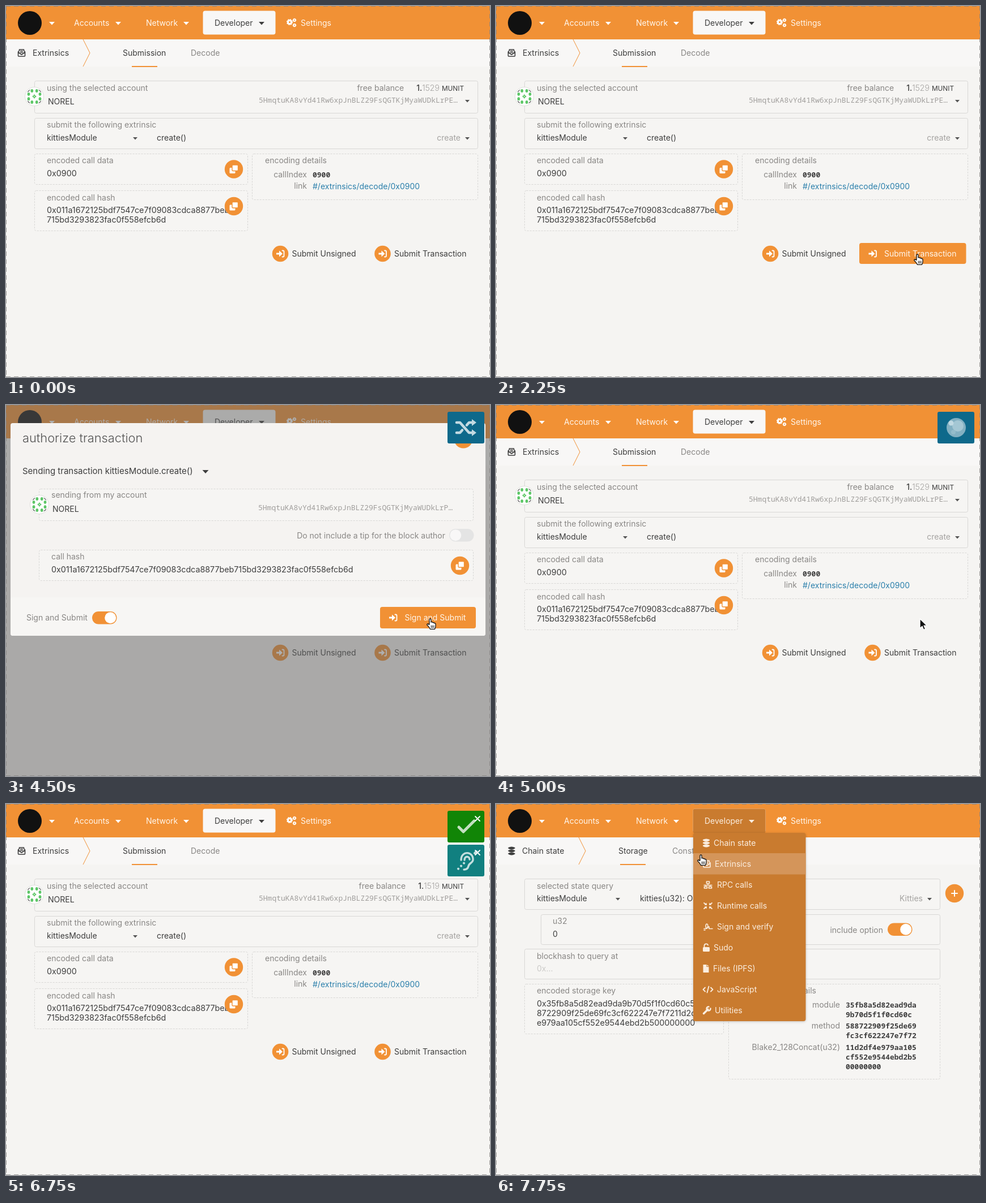
Recreate the animation shown at these times as an HTML page. Size 854 px wide and 656 px high, loop 8000 ms.

```html
<!DOCTYPE html>
<html lang="en">
<head>
<meta charset="utf-8">
<title>Extrinsic submission</title>
<style>
  html, body { margin: 0; width: 100%; height: 100%; overflow: hidden; background: #f5f4f2; }
  svg { display: block; width: 854px; height: 656px; }
  text { font: 14px Inter, "Open Sans", sans-serif; fill: #3e3e3e; white-space: pre; }
  .label { fill: #898785; }
  .faint { fill: #a5a3a1; }
  .ghost { fill: #cbcac8; }
  .white { fill: #fff6ec; }
  .menu { fill: #fbeee0; }
  .link { fill: #2a7fab; }
  .end { text-anchor: end; }
  .hex { font-size: 14.28px; }
  .mono { font: 600 13px "Noto Sans Mono", "DejaVu Sans Mono", monospace; }
  .address { font: 13px "Noto Sans Mono", "DejaVu Sans Mono", monospace; fill: #a09e9c; }
  .title { font-size: 21.8px; font-weight: 300; fill: #555; }
  .lead { font-size: 15px; }
  .part { visibility: hidden; }
  .part.on { visibility: visible; }
</style>
</head>
<body>
<svg id="stage" viewBox="0 0 854 656"></svg>
<script>
const ORANGE = '#f19135', MENU = '#c97b2f', DARK = '#3e3e3e';
const ACCOUNT = 'NOREL';
const ADDRESS = '5HmqtuKA8vYd41Rw6xpJnBLZ29FsQGTKjMyaWUDkLrPE';
const HASH = ['0x011a1672125bdf7547ce7f09083cdca8877beb', '715bd3293823fac0f558efcb6d'];

const text = (x, y, content, cls = '') => `<text x="${x}" y="${y}" class="${cls}">${content}</text>`;
const box = (l, t, r, b, fill, rx = 0, extra = '') =>
  `<rect x="${l}" y="${t}" width="${r - l}" height="${b - t}" rx="${rx}" fill="${fill}" ${extra}/>`;
const disc = (x, y, r, fill) => `<circle cx="${x}" cy="${y}" r="${r}" fill="${fill}"/>`;
const at = (x, y, content, color = '#fff') =>
  `<g transform="translate(${x} ${y})" fill="${color}" stroke="none" color="${color}">${content}</g>`;
const line = (d, width = 1.5) =>
  `<path d="${d}" fill="none" stroke="currentColor" stroke-width="${width}" stroke-linecap="round" stroke-linejoin="round"/>`;
const fill = d => `<path d="${d}"/>`;
const part = (id, content) => `<g class="part" id="${id}">${content}</g>`;

const panel = (l, t, r, b, dashed) => box(l + .5, t + .5, r - .5, b - .5, '#f6f5f3', 3,
  `stroke="#d8d7d5" ${dashed ? 'stroke-dasharray="3 2"' : ''}`);
const caret = (x, y, color = '#555', w = 4) => at(x, y, fill(`M${-w}-2h${2 * w}L0 ${w - 1.5}z`), color);

const icon = {
  signIn: fill('M-7-1.6h5v-3.9L4 0l-6 5.5V1.6h-5z') + line('M3.5-5.5h1.2q1.8 0 1.8 1.8v7.4q0 1.8-1.8 1.8H3.5', 1.8),
  copy: box(-7.5, -2.5, 2.5, 7.5, '#fff', 1.5) + box(-3, -7.5, 7.5, 3, '#fff', 1.5, `stroke="${ORANGE}" stroke-width="1.4"`),
  gear: r => `<circle r="${r}" fill="none" stroke="currentColor" stroke-width="${r}"/>` +
    `<circle r="${r * 1.5}" fill="none" stroke="currentColor" stroke-width="${r * .5}" stroke-dasharray="${r * .59}"/>`,
  envelope: line('M-6-1.5V-2L-4-4V-6H4v2l2 2v7q0 1-1 1H-5q-1 0-1-1V-1.5L0 3l6-4.5', 1.6) + line('M-2-3.5h4M-2-1h4', 1.3),
  database: [-5, 0, 5].map(y => fill(`M-6 ${y - 1}q6-3 12 0v1.5q-6 4-12 0z`)).join(''),
  network: line('M-7 .5H7M0-2V.5M-4 .5V3M4 .5V3', 1.3) + line('M-2.5-6h5v3.5h-5zM-6.5 3h5v3h-5zM1.5 3h5v3h-5z', 1.6),
  compress: line('M-7-5l4 3M7-5l-4 3M-7 5l4-3M7 5l-4-3', 1.8) +
    fill('M-2-1.5h-4.5l4-4zM2-1.5h4.5l-4-4zM-2 1.5h-4.5l4 4zM2 1.5h4.5l-4 4z'),
  sign: line('M-7 3.5h3c4 0 5-8 2-8.5-3 0-2 9 0 8s3-4 4-3-1 3 0 3.5h6M-7 6h2', 1.6),
  unlock: box(-6, -1, 6, 7, 'currentColor', 1.5) + line('M-3.5-1v-2.5c0-4 6-4 6.5-1', 1.8),
  file: fill('M-5-7h6v4h4V7H-5zM2-7l3 3H2z'),
  code: line('M-5-3.5L-8.5 0L-5 3.5M5-3.5L8.5 0L5 3.5M1.5-5.5l-3 11', 1.8),
  wrench: line('M-5.5 5.5L2-2', 3.4) + line('M6.5-3.5A3.5 3.5 0 1 1 3.5-6.5', 2.4),
  compass: line('M6 0A6 6 0 1 1 6-.1', 1.6) + fill('M3-3L1 1-3 3-1-1z'),
  calendar: line('M-5.5-4.5h11v10h-11zM-5.5-1.5h11M-2.5-6.5v2M2.5-6.5v2', 1.7),
  shuffle: line('M-17-9h6L5 9h7M-17 9h6l4-4.5M1-4.5L5-9h7', 4.6) + fill('M10-15l8 6-8 6zM10 3l8 6-8 6z'),
  check: line('M-13 1l8 8L14-10', 5),
  ear: line('M-9-1C-9-18 13-17 12-1c-1 6-7 5-8 11-1 4-4 6-8 6M-3-1c0-8 9-7 9-1', 3.4) +
    line('M-14 14.5l.1.1M-9 9.5l.1.1M-4 4.5l.1.1M15-13l3-3', 4),
  close: line('M-4-4L4 4M4-4L-4 4', 1.8),
};

const copyButton = (x, y) => disc(x, y, 16.2, ORANGE) + at(x, y, icon.copy);
const actionButton = (x, y, name) => disc(x, y, 14.3, ORANGE) + at(x, y, icon.signIn) + text(x + 20.5, y + 5, name);
const hoverButton = (x, y, name, l, t, r, b) =>
  box(l, t, r, b, ORANGE, 4) + at(x, y, icon.signIn) + text(x + 20.5, y + 5, name, 'white');
const toggle = (x, y, on) => box(x, y, x + 43.5, y + 22.5, on ? ORANGE : '#e4e4e4', 11.25) +
  disc(x + (on ? 32.2 : 11.3), y + 11.25, 10, on ? '#fff' : '#f8f7f7');

function identicon(x, y) {
  const dots = [[4.2, 10], [10, 4.2]].flatMap(([a, b]) =>
    [[1, 1], [1, -1], [-1, 1], [-1, -1]].map(([s, u]) =>
      `<ellipse cx="${a * s}" cy="${b * u}" rx="2.4" ry="2.9" fill="#5dc667"/>`)).join('');
  const turns = shape => [0, 90, 180, 270].map(a => `<g transform="rotate(${a})">${shape}</g>`).join('');
  return at(x, y, `<circle r="16.5" fill="#fff" stroke="#dedddb"/>` + dots +
    turns('<path d="M7 12.5Q11 11 12.5 7L9.5 9.5z" fill="#333"/>') + turns(disc(2, 0, 1.4, '#5dc667')));
}

const balance = value => `<text x="808" y="150" class="end"><tspan class="label">free balance</tspan>` +
  `<tspan dx="22" font-weight="500">1.</tspan><tspan font-weight="300" fill="#a5a3a1">${value}</tspan>` +
  `<tspan dx="4" font-size="11.8">MUNIT</tspan></text>`;

const developerTab = open => box(347.5, 8.5, 475.5, open ? 52 : 50.5, open ? MENU : '#f8f7f6', 4) +
  text(368, 35, 'Developer', open ? 'menu' : '') + caret(451, 30, open ? '#fbeee0' : DARK, 5);

const header = box(0, 0, 854, 59, ORANGE) + disc(42, 30, 21, '#111') +
  text(120, 35, 'Accounts', 'white') + text(247, 35, 'Network', 'white') + text(520, 35, 'Settings', 'white') +
  [81, 198, 318].map(x => caret(x, 30, '#fff', 5)).join('') + developerTab(false) +
  at(500.5, 28.5, icon.gear(3.2)) + at(509, 25, icon.gear(1.9)) + at(509, 34, icon.gear(1.9)) +
  box(0, 59, 854, 107, '#f8f7f6');

const subNav = (glyph, name, x, chevron, tab, tabX, lineX) => at(27.5, 83, glyph, DARK) + text(x, 88, name) +
  `<path d="M${chevron} 59l12 24-12 24" fill="none" stroke="${ORANGE}"/>` +
  text(tabX, 88, tab) + box(lineX, 106, lineX + 45, 108, ORANGE);

const extrinsics = subNav(icon.envelope, 'Extrinsics', 47, 136, 'Submission', 206, 222) + text(326, 88, 'Decode', 'label') +
  panel(50, 132, 833, 190) + text(72, 150, 'using the selected account', 'label') + text(74, 174, ACCOUNT) +
  text(446, 171, ADDRESS + '…', 'address') + caret(814, 168) + identicon(50, 160) +
  panel(50, 198, 833, 253) + text(72, 215, 'submit the following extrinsic', 'label') +
  text(72, 238, 'kittiesModule') + caret(228, 234) + text(266, 238, 'create()') +
  text(802, 238, 'create', 'faint end') + caret(814, 234) +
  panel(50, 261, 427, 316, 1) + text(72, 278, 'encoded call data', 'label') + text(72, 301, '0x0900', 'hex') + copyButton(402, 288.5) +
  panel(50, 326, 427, 398, 1) + text(72, 344, 'encoded call hash', 'label') +
  text(72, 366, HASH[0], 'hex') + text(72, 383, HASH[1], 'hex') + copyButton(402, 354) +
  panel(434, 261, 833, 343, 1) + text(457, 278, 'encoding details', 'label') +
  text(531, 303, 'callIndex', 'label end') + text(541, 303, '0900', 'mono') +
  text(531, 323, 'link', 'label end') + text(541, 324, '#/extrinsics/decode/0x0900', 'link') +
  actionButton(484, 438, 'Submit Unsigned') + actionButton(664.5, 438, 'Submit Transaction');

const details = [[360, '35fb8a5d82ead9da'], [377, '9b70d5f1f0cd60c'], [397, '588722909f25de69'], [414, 'fc3cf622247e7f72'],
  [435, '11d2df4e979aa105'], [452, 'cf552e9544ebd2b5'], [469, '00000000']];

const chainState = subNav(icon.database, 'Chain state', 46, 146, 'Storage', 216, 219) +
  text(311, 88, 'Constants', 'label') + text(421, 88, 'Raw storage', 'label') +
  panel(50, 132, 784, 187) + text(72, 150, 'selected state query', 'label') +
  text(72, 172, 'kittiesModule') + caret(215, 168) + text(254, 172, 'kitties(u32): Option&lt;Kitty&gt;') +
  text(753, 172, 'Kitties', 'faint end') + caret(765, 168) +
  disc(809, 158, 16.2, ORANGE) + at(809, 158, line('M-5 0H5M0-5V5', 2)) +
  panel(79, 195, 784, 249) + text(100, 212, 'u32', 'label') + text(100, 235, '0') +
  text(683, 228, 'include option', 'label end') + toggle(691, 210.5, true) +
  panel(50, 256, 784, 310) + text(72, 274, 'blockhash to query at', 'label') + text(72, 296, '0x...', 'ghost') +
  panel(50, 318, 402, 407, 1) + text(72, 335, 'encoded storage key', 'label') +
  ['0x35fb8a5d82ead9da9b70d5f1f0cd60c58', '8722909f25de69fc3cf622247e7f7211d2df4', 'e979aa105cf552e9544ebd2b500000000']
    .map((s, i) => text(72, 358 + 17 * i, s, 'hex')).join('') + copyButton(377, 346) +
  panel(410, 318, 784, 487, 1) + text(565, 335, 'storage key details', 'label end') +
  text(607, 360, 'module', 'label end') + text(607, 397, 'method', 'label end') +
  text(607, 435, 'Blake2_128Concat(u32)', 'label end') + details.map(([y, s]) => text(617, y, s, 'mono')).join('');

const modal = box(0, 0, 854, 656, 'rgba(96,96,96,.5)') + box(8, 32, 846, 408, '#f5f3f1', 4) + box(8, 340, 846, 408, '#f7f6f4', 4) +
  text(29, 66, 'authorize transaction', 'title') + disc(807, 60, 16.5, ORANGE) +
  text(29, 122, 'Sending transaction kittiesModule.create()', 'lead') + caret(352, 117, DARK, 5.5) +
  panel(58, 148, 825, 205, 1) + identicon(59, 176) + text(80, 164, 'sending from my account', 'label') +
  text(82, 189, ACCOUNT) + text(445, 186, ADDRESS.slice(0, 43) + '…', 'address') +
  text(775, 236, 'Do not include a tip for the block author', 'label end') + toggle(782, 219, false) +
  panel(58, 256, 825, 311, 1) + text(80, 273, 'call hash', 'label') + text(80, 296, HASH.join(''), 'hex') + copyButton(801, 284) +
  text(36, 381, 'Sign and Submit', 'label') + toggle(152, 365, true) + actionButton(683, 376, 'Sign and Submit');

const notice = (y, color, content) => box(779, y, 844, y + 56, color, 3) + content;
const spinner = disc(0, 0, 17, '#82b0c2') + disc(3, -3, 10, '#a4c7d4') + disc(-9, -8, 4.5, '#c0d9e2') + disc(-5, 8, 4, '#94bccb');
const result = (y, color, glyph) =>
  notice(y, color, at(812, y + 28, glyph, 'rgba(255,255,255,.75)') + at(832, y + 14, icon.close));

const menuItems = rows => rows.map(([glyph, x, name], i) =>
  at((354 + x) / 2 + 2, 69 + 37 * i, icon[glyph], '#fbeee0') + text(x, 74 + 37 * i, name, 'menu')).join('');
const menuBox = rows => box(348, 51, 546.5, 51 + 37 * rows, MENU, 4, 'style="filter:drop-shadow(0 1px 2px #0003)"');
const developerRows = [['database', 384, 'Chain state'], ['envelope', 386, 'Extrinsics'], ['network', 390, 'RPC calls'],
  ['compress', 390, 'Runtime calls'], ['sign', 390, 'Sign and verify'], ['unlock', 384, 'Sudo'],
  ['file', 383, 'Files (IPFS)'], ['code', 390, 'JavaScript'], ['wrench', 386, 'Utilities']];
const networkRows = [['compass', 386, 'Explorer'], ['calendar', 386, 'Event calendar']];

const outline = 'stroke-width="1.3" stroke-linejoin="round"';
const arrow = `<path d="M1 1v17l4-3.7 2.6 6 3-1.3-2.6-5.8h5.5z" fill="#111" stroke="#fff" ${outline}/>`;
const hand = `<path d="M5 11V2.5q0-1.5 1.5-1.5T8 2.5V7q2.5-1 3 .8 2-.8 2.5 1 2.3-.6 2.5 1.5v4q0 2-1.5 5H6.5Q5 15.5 1 12q-.5-2 1.5-2 1.5.3 2.5 2" fill="#fff" stroke="#111" ${outline}/>` +
  line('M8.3 13v4M10.6 13v4M12.9 13v4', 1);

const stage = document.getElementById('stage');
stage.innerHTML = box(0, 0, 854, 656, '#f5f4f2') + header +
  part('extrinsics', extrinsics) + part('before', balance('1529')) + part('after', balance('1519')) +
  part('chain', chainState) +
  part('hoverUnsigned', hoverButton(484, 438, 'Submit Unsigned', 460, 419, 635, 456)) +
  part('hoverSigned', hoverButton(664.5, 438, 'Submit Transaction', 641, 419, 829.5, 456)) +
  part('modal', modal) + part('hoverSign', hoverButton(683, 376, 'Sign and Submit', 660, 357, 829, 395)) +
  part('queued', notice(12, '#0e698b', at(812, 40, icon.shuffle, '#c3dae2'))) +
  part('sending', notice(12, '#0e698b', at(812, 40, `<g id="spinner">${spinner}</g>`))) +
  part('done', result(12, '#118506', icon.check) + result(72, '#118080', icon.ear)) +
  part('developer', developerTab(true) + menuBox(9)) +
  part('hoverRow', box(348, 87, 546.5, 124.5, '#d4955a')) +
  part('developerItems', menuItems(developerRows)) +
  part('network', `<g transform="translate(-120 0)">${box(348, 9, 463, 52, MENU, 4)}${menuBox(2)}${menuItems(networkRows)}</g>` +
    text(247, 35, 'Network', 'menu') + caret(318, 30, '#fbeee0', 5)) +
  `<path d="M.5 0V656M853.5 0V656M0 .5H854M0 655.5H854" stroke="#858381" stroke-dasharray="8 6" opacity=".75"/>` +
  `<g id="pointer">${part('arrow', arrow)}${part('hand', at(0, 0, hand, '#111'))}</g>`;

// Start time, visible parts, pointer position
const page = 'extrinsics before', later = 'extrinsics after done', open = 'developer developerItems';
const steps = [
  [0, page],
  [500, page + ' arrow', 810, 428],
  [750, page + ' arrow', 625, 477],
  [1000, page + ' arrow', 659, 450],
  [1250, page + ' arrow', 535, 433],
  [1500, page + ' hand', 533, 433],
  [1750, page + ' hoverUnsigned hand', 533, 433],
  [2000, page + ' hoverSigned hand', 751, 437],
  [2250, page + ' hoverSigned hand', 737, 438],
  [3750, page + ' modal queued arrow', 742, 437],
  [4250, page + ' modal queued arrow', 747, 388],
  [4500, page + ' modal queued hoverSign hand', 742, 377],
  [5000, page + ' sending arrow', 747, 377],
  [5250, page + ' sending arrow', 532, 349],
  [5500, later + ' arrow', 549, 324],
  [5750, later + ' arrow', 511, 257],
  [6000, later + ' arrow', 470, 63],
  [6250, `${later} ${open} hand`, 305, 49],
  [6500, later + ' network hand', 290, 46],
  [6750, later],
  [7250, 'chain'],
  [7750, `chain ${open} hoverRow hand`, 355, 89],
];

const LOOP = 8000;
const parts = [...stage.querySelectorAll('.part')];
const pointer = document.getElementById('pointer');
const spinnerNode = document.getElementById('spinner');
let shown;

function render(time) {
  const step = steps.findLast(s => s[0] <= time);
  if (step === shown) return;
  shown = step;
  const [start, names, x = 0, y = 0] = step;
  const visible = new Set(names.split(' '));
  parts.forEach(p => p.classList.toggle('on', visible.has(p.id)));
  pointer.setAttribute('transform', `translate(${x} ${y})`);
  spinnerNode.setAttribute('transform', `rotate(${start >= 5250 ? 120 : 0})`);
}

const origin = performance.now();
function tick() {
  render((performance.now() - origin) % LOOP);
  requestAnimationFrame(tick);
}
tick();
</script>
</body>
</html>
```
